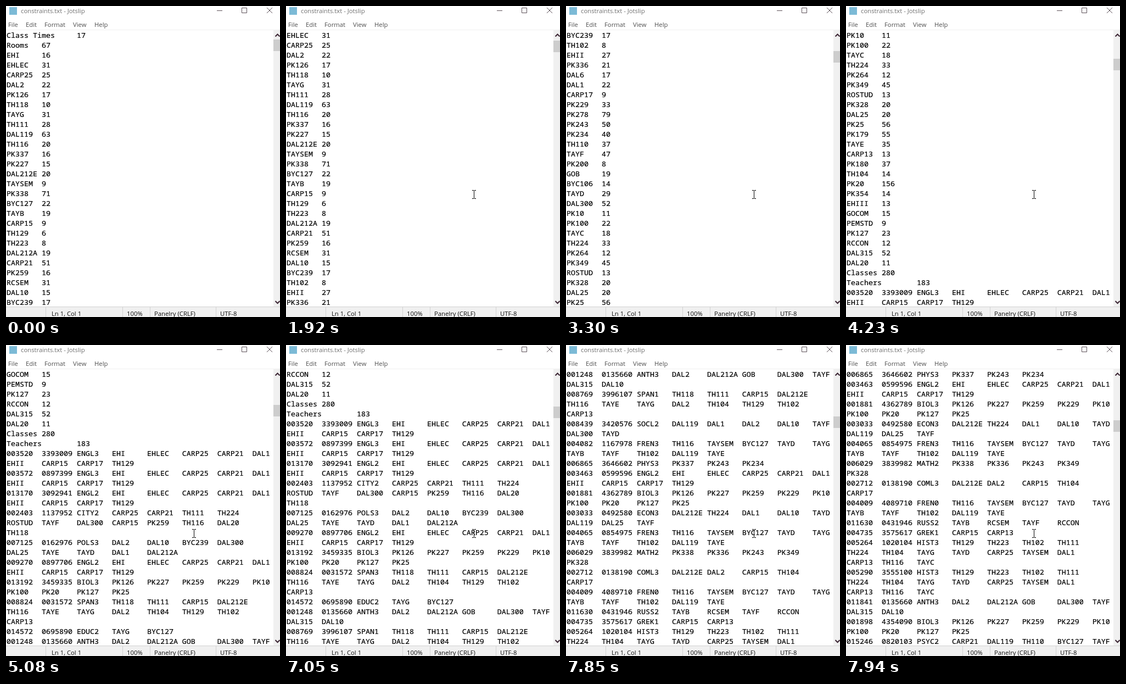
An HTML page that plays this animation: 499x566 px, repeating every 8000 ms.

```html
<!DOCTYPE html>
<html lang="en">
<head>
<meta charset="utf-8">
<title>constraints.txt</title>
<style>
  html, body { margin: 0; width: 100%; height: 100%; overflow: hidden; background: #fff; }
  #stage { position: relative; width: 499px; height: 566px; overflow: hidden; background: #fff; }
  #page {
    position: absolute; left: 1px; top: 44px; width: 486px; height: 503px;
    margin: 0; overflow: hidden; color: #000;
    font: 13.3333px/18px "Noto Sans Mono", monospace;
    font-variant-ligatures: none;
    -webkit-text-stroke: .2px #000;
  }
  svg { position: absolute; left: 0; top: 0; }
  text { font: 11.3px "Open Sans", sans-serif; }
  .title { fill: #707070; }
  .menu { fill: #505050; }
  .status { fill: #101010; }
  .buttons { fill: none; stroke: #5c5058; }
  .arrows { fill: none; stroke: #3c2634; stroke-width: 2; }
  .dividers { stroke: #d2d2d2; }
</style>
</head>
<body>
<div id="stage">
  <pre id="page"></pre>
  <svg width="499" height="566" viewBox="0 0 499 566">
    <rect x="6" y="2" width="14" height="14" fill="#7cbad6"/>
    <text class="title" x="27" y="13">constraints.txt - Jotslip</text>
    <path class="buttons" d="M384 8.5h10M429.5 3.5h9v9h-9zM475 3l10 10M485 3l-10 10"/>
    <g class="menu">
      <text x="4" y="38">File</text>
      <text x="36" y="38">Edit</text>
      <text x="70" y="38">Format</text>
      <text x="122" y="38">View</text>
      <text x="161" y="38">Help</text>
    </g>
    <path d="M0 43.5H499" stroke="#f0f0f0"/>
    <rect x="487" y="44" width="12" height="503" fill="#f0f0f0"/>
    <rect id="thumb" x="487" y="61" width="12" height="21" fill="#cdcdcd"/>
    <path class="arrows" d="M490.5 55.5l4-4l4 4M490.5 537l4 4l4-4"/>
    <rect y="547" width="499" height="19" fill="#f0f0f0"/>
    <path class="dividers" d="M0 547.5H499M72.5 548v18M212.5 548v18M262.5 548v18M382.5 548v18"/>
    <g class="status">
      <text x="83" y="564">Ln 1, Col 1</text>
      <text x="220" y="564">100%</text>
      <text x="270" y="564">Panelry (CRLF)</text>
      <text x="390" y="564">UTF-8</text>
    </g>
    <g id="cursor">
      <path id="beam" fill="none" stroke="#000"
        d="M-3 -7.5h3M1 -7.5h3M.5 -7V7M-3 7.5h3M1 7.5h3"/>
      <path id="arrow" fill="#fff" stroke="#000"
        d="M.5 .5v15l3.5-3.5l2.5 6l2.5-1l-2.5-6h5z"/>
    </g>
  </svg>
</div>
<script>
const LOOP = 8000, ROWS = 28;
const $ = id => document.getElementById(id);

// Courses that share the same rooms
const engl = 'EHI EHLEC CARP25 CARP21 DAL1/EHII CARP15 CARP17 TH129';
const biol = 'PK126 PK227 PK259 PK229 PK10/PK100 PK20 PK127 PK25';
const span = 'TH118 TH111 CARP15 DAL212E/TH116 TAYE TAYG DAL2 TH104 TH129 TH102/CARP13';
const fren = 'TH116 TAYSEM BYC127 TAYD TAYG/TAYB TAYF TH102 DAL119 TAYE';
const anth = 'DAL2 DAL212A GOB DAL300 TAYF/DAL315 DAL10';
const hist = 'TH129 TH223 TH102 TH111/TH224 TH104 TAYG TAYD CARP25 TAYSEM DAL1/CARP13 TH116 TAYC';

// "/" ends a line, a space is a tab, "_" is a plain space
const source = `Class_Times 17/Rooms 67/EHI 16/EHLEC 31/CARP25 25/DAL2 22/PK126 17/TH118 10
TAYG 31/TH111 28/DAL119 63/TH116 20/PK337 16/PK227 15/DAL212E 20/TAYSEM 9
PK338 71/BYC127 22/TAYB 19/CARP15 9/TH129 6/TH223 8/DAL212A 19/CARP21 51
PK259 16/RCSEM 31/DAL10 15/BYC239 17/TH102 8/EHII 27/PK336 21/DAL6 17
DAL1 22/CARP17 9/PK229 33/PK278 79/PK243 50/PK234 40/TH110 37/TAYF 47
PK200 8/GOB 19/BYC106 14/TAYD 29/DAL300 52/PK10 11/PK100 22/TAYC 18
TH224 33/PK264 12/PK349 45/ROSTUD 13/PK328 20/DAL25 20/PK25 56/PK179 55
TAYE 35/CARP13 13/PK180 37/TH104 14/PK20 156/PK354 14/EHIII 13/GOCOM 15
PEMSTD 9/PK127 23/RCCON 12/DAL315 52/DAL20 11/Classes 280/Teachers 183
003520 3393009 ENGL3 ${engl}
003572 0897399 ENGL3 ${engl}
013170 3092941 ENGL2 ${engl}
002403 1137952 CITY2 CARP25 CARP21 TH111 TH224
ROSTUD TAYF DAL300 CARP15 PK259 TH116 DAL20/TH118
007125 0162976 POLS3 DAL2 DAL10 BYC239 DAL300/DAL25 TAYE TAYD DAL1 DAL212A
009270 0897706 ENGL2 ${engl}
013192 3459335 BIOL3 ${biol}
008824 0031572 SPAN3 ${span}
014572 0695890 EDUC2 TAYG BYC127
001248 0135660 ANTH3 ${anth}
008769 3996107 SPAN1 ${span}
008439 3420576 SOCL2 DAL119 DAL1 DAL2 DAL10 TAYF/DAL300 TAYD
004082 1167978 FREN3 ${fren}
006865 3646602 PHYS3 PK337 PK243 PK234
003463 0599596 ENGL2 ${engl}
001881 4362789 BIOL3 ${biol}
003033 0492580 ECON3 DAL212E TH224 DAL1 DAL10 TAYD/DAL119 DAL25 TAYF
004065 0854975 FREN3 ${fren}
006029 3839982 MATH2 PK338 PK336 PK243 PK349/PK328
002712 0138190 COML3 DAL212E DAL2 CARP15 TH104/CARP17
004009 4089710 FREN0 ${fren}
011630 0431946 RUSS2 TAYB RCSEM TAYF RCCON
004735 3575617 GREK1 CARP15 CARP13
005264 1020104 HIST3 ${hist}
005290 3555100 HIST3 ${hist}
011841 0135660 ANTH3 ${anth}
001898 4354090 BIOL3 ${biol}
015246 0820103 PSYC2 CARP21 DAL119 TH110 BYC127 TAYF`;

const tab = word => word.replace('_', ' ').padEnd(8 * (Math.floor(word.length / 8) + 1));
const lines = source.split(/[\/\n]/).map(line => line.split(' ').map(tab).join('').trimEnd());

// Wheel rolls: first notch, last notch, number of notches
const rolls = [
  [1920, 2120, 3], [2790, 3150, 6], [3830, 4230, 6],
  [4810, 5080, 6], [7050, 7250, 5], [7300, 7360, 3], [7850, 7940, 4]
];
const notches = rolls.flatMap(([from, to, n]) =>
  Array.from({ length: n }, (_, i) => from + (to - from) * i / (n - 1)));

let shown = -1;
function scroll(t) {
  const top = 3 * notches.filter(at => at <= t).length;
  if (top === shown) return;
  shown = top;
  $('page').textContent = lines.slice(top, top + ROWS).join('\n');
  $('thumb').setAttribute('y', Math.round(61 + top * 0.768));
}

function point(t) {
  const k = Math.min(12, Math.floor((t - 250) / 30));
  const ease = 1 - (1 - k / 12) ** 2;
  const x = Math.round(460 - 118 * ease);
  const y = Math.round(560 - 217 * ease);
  const inPage = y < 547;
  $('cursor').style.display = t < 250 ? 'none' : '';
  $('beam').style.display = inPage ? '' : 'none';
  $('arrow').style.display = inPage ? 'none' : '';
  $('cursor').setAttribute('transform', `translate(${x} ${y})`);
}

function draw() {
  const t = performance.now() % LOOP;
  scroll(t);
  point(t);
  requestAnimationFrame(draw);
}
draw();
</script>
</body>
</html>
```
